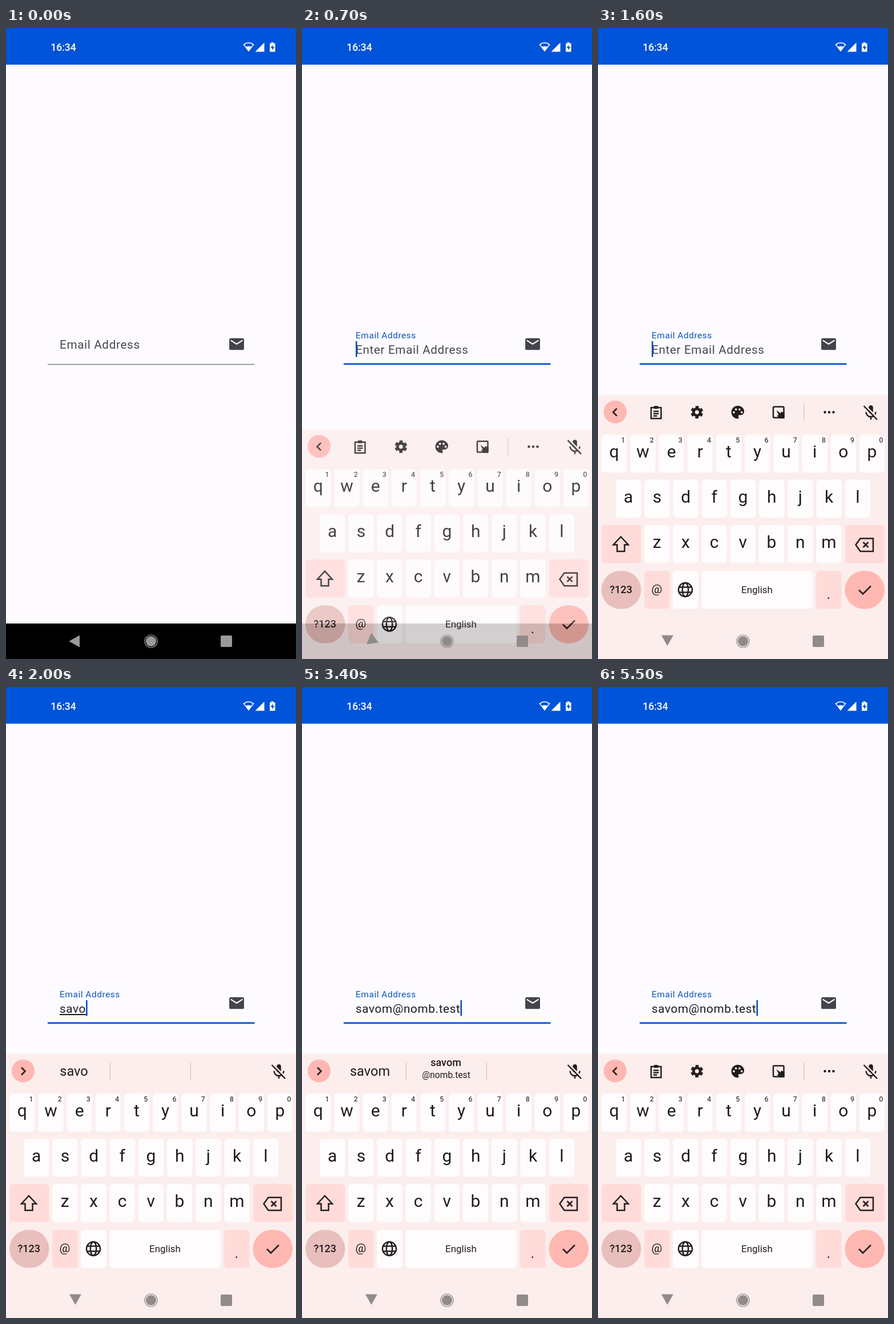
These frames come from a looping animation (508 px wide and 1102 px high, 5.9 s). An HTML page:

```html
<!DOCTYPE html>
<html lang="en">
<head>
<meta charset="utf-8">
<title>Email field</title>
<style>
  html, body { margin: 0; width: 100%; height: 100%; overflow: hidden; background: #fdfbff; }
  svg { display: block; width: 100vw; height: 100vh; font-family: Roboto, sans-serif; }
  .mid { text-anchor: middle; }
  .field { font-size: 20.7px; letter-spacing: .646px; }
  .line { fill: none; stroke: #241e1f; stroke-width: 2.5; }
  #keyboard { fill: #211b1c; }
</style>
</head>
<body>
<svg id="stage" viewBox="0 0 508 1102" preserveAspectRatio="none"></svg>
<script>
const LOOP = 5900, NAME = 'savom', DOMAIN = '@nomb.test';
const PANEL = '#fceeed', WHITE = '#fffcfd', PINK = '#ffdcda', CORAL = '#ffb7b1';
const BLUE = '#0055d4', PITCH = 50.2;
const CARET_TOGGLES = [600, 1000, 1600, 2600, 3100, 4000, 4500, 5000, 5500];

const text = (x, y, size, str, extra = '') =>
  `<text class="mid" x="${x}" y="${y}" font-size="${size}" ${extra}>${str}</text>`;
const rect = (x, y, w, h, fill, r = 0, extra = '') =>
  `<rect x="${x}" y="${y}" width="${w}" height="${h}" rx="${r}" fill="${fill}" ${extra}/>`;
const circle = (x, y, r, extra = '') => `<circle cx="${x}" cy="${y}" r="${r}" ${extra}/>`;
const line = (d, extra = '') => `<path class="line" d="${d}" ${extra}/>`;
const divider = x => rect(x, 656, 1.5, 30, '#d8caca');

const letterRow = (letters, x, y, digits = '') => [...letters].map((c, i) => {
  const left = x + i * PITCH;
  return rect(left, y, 44.5, 66.5, WHITE, 6) + text(left + 22.2, y + 39.5, 30, c) +
    (digits ? text(left + 38, y + 14, 12.5, digits[i], 'font-weight="500" fill="#4a4243"') : '');
}).join('');

const statusBar = rect(0, 0, 508, 64, '#0054d9') +
  `<g fill="#fff">${text(100.5, 40, 17.5, '16:34', 'font-weight="500"')}
    <path d="M416.5 29Q425 22.5 433.5 29L425 40Z" fill="none" stroke="#fff" stroke-width="1.6"/>
    <path d="M419.5 33.5Q425 30 430.5 33.5L425 41Z"/>
    <path d="M452.5 25.5V41.5H436.5Z"/>
    <path d="M464.5 25h4v2h3v14.5h-9.5V27h2.500Z"/>
    <path d="M467.500 29l-4 6h2.800v4l4-6h-2.800Z" fill="#0054d9"/></g>`;

const field = `
  <rect id="rule" x="73" width="362.500"/>
  <text id="label" fill="#48464c"></text>
  <text id="hint" class="field" x="94" y="569" fill="#49464c">Enter Email Address</text>
  <text id="value" class="field" x="94" y="569" fill="#1d1b1f"></text>
  <rect id="caret" y="547" width="2.6" height="27.500" fill="#0a50b8"/>
  <path transform="translate(388.5 536.5) scale(1.293)" fill="#45444e"
    d="M20 4H4a2 2 0 0 0-2 2v12a2 2 0 0 0 2 2h16a2 2 0 0 0 2-2V6a2 2 0 0 0-2-2zm0 4l-8 5-8-5V6l8 5 8-5z"/>`;

const clipboard = line('M93 663H110.500V682H93ZM97 669.500H106.500M97 673.500H106.500M97 677.500H103.500', 'stroke-width="2"') +
  rect(97.500, 660, 8.500, 5, '#241e1f', 2);
const gear = circle(173.3, 671, 5.9, 'class="line" style="stroke-width:4.8"') +
  circle(173.3, 671, 9, 'class="line" style="stroke-width:4" stroke-dasharray="5.4 4.025" stroke-dashoffset="-2.01"');
const palette = `<g transform="translate(229.800 656) scale(1.25)">
  <path d="M12 3a9 9 0 0 0 0 18c.8 0 1.5-.7 1.5-1.500 0-.8-.8-1.200-.8-2 0-.8.7-1.500 1.500-1.500H16a5 5 0 0 0 5-5C21 6.600 17 3 12 3z"/>
  <g fill="${PANEL}">${[[6.5, 12], [9.5, 8], [14.5, 8], [17.5, 12]].map(([x, y]) => circle(x, y, 1.5)).join('')}</g></g>`;
const resize = rect(307, 661.500, 18.500, 19, 'none', 1.5, 'class="line"') +
  '<path d="M312.500 667.500l7 5.500 1.500-3 5.500 2v10h-8l-5-5 3-1Z"/>';
const mic = rect(474.2, 659, 7.6, 14, '#241e1f', 3.8) +
  line('M469.500 670.500a8.500 8.500 0 0 0 17 0M478 679V684') +
  line('M467.500 658.500L491 682.500', `style="stroke:${PANEL}"`) + line('M465.500 660L489 684');

const toolbar = `<g id="toolbar">${line('M33 664.500L26.500 671L33 677.500') + clipboard + gear + palette + resize +
  divider(360.3) + [397.5, 405, 412.5].map(x => circle(x, 671, 2.2)).join('')}</g>`;
const suggestions = `<g id="suggestions">${line('M27 664.500L33.500 671L27 677.500')}
  ${text(119, 679, 23.6, '', 'id="word"') + divider(181.7) + divider(322.700)}
  <g id="completion">${text(252, 661.5, 18, NAME, 'font-weight="500"') + text(252.5, 683, 15.6, DOMAIN)}</g></g>`;

const bottomRow = rect(6, 948, 69.5, 66.5, '#e8bfbc', 33.2) + text(40.3, 987, 18, '?123', 'font-weight="500"') +
  rect(81, 948, 44.5, 66.5, PINK, 6) + text(103, 987, 21, '@') +
  rect(131, 948, 44.5, 66.5, WHITE, 6) +
  line('M142 976.500H164M142 985.500H164') + circle(153, 981, 12, 'class="line"') +
  '<ellipse class="line" cx="153" cy="981" rx="5.2" ry="12"/>' +
  rect(181, 948, 195.5, 66.5, WHITE, 6) + text(278.5, 986.5, 17, 'English') +
  rect(382, 948, 44.5, 66.5, PINK, 6) + text(404, 997, 24, '.') +
  rect(432.5, 948, 69.5, 66.5, CORAL, 33.2) + line('M457 981.500L464 988.500L478 974.500');

const keyboard = `<g id="keyboard">${rect(0, 640.5, 508, 461.5, PANEL) +
  circle(30, 670.500, 20, `fill="${CORAL}"`) + toolbar + suggestions + mic +
  letterRow('qwertyuiop', 6, 710, '1234567890') +
  letterRow('asdfghjkl', 31, 789) +
  rect(6, 868, 69.5, 66.5, PINK, 6) + line('M40 888.500L53 902.500H46.500V914H33.500V902.500H27Z') +
  letterRow('zxcvbnm', 81, 868) +
  rect(433, 868, 69.5, 66.5, PINK, 6) +
  line('M451.500 902.500L459.500 891.500H482V914H459.500ZM464.500 898L473.500 907M473.500 898L464.500 907') +
  bottomRow}</g>`;

const navigation = `<g id="nav"><path id="back" d="M-9.500 0L9-10.500V10.500Z"/>
  ${circle(254, 1071, 9)}${circle(254, 1071, 11, 'fill="none" stroke="currentColor" stroke-width="1.2"')}
  <rect x="376" y="1061" width="20" height="20" rx="2"/></g>`;

document.getElementById('stage').innerHTML = rect(0, 0, 508, 1102, '#fdfbff') + statusBar + field +
  rect(0, 1040, 508, 62, '#000') + keyboard + navigation;

const el = id => document.getElementById(id);
const set = (id, attrs) => { for (const key in attrs) el(id).setAttribute(key, attrs[key]); };
const progress = (t, start, length) => Math.min(1, Math.max(0, (t - start) / length));
const ease = p => p * p / (p * p + (1 - p) ** 2 / 2);
const mix = (a, b, p) => a + (b - a) * p;

function draw(now) {
  // The screen refreshes ten times a second.
  const t = Math.floor(now % LOOP / 100) * 100;
  const focus = ease(progress(t, 450, 200));
  const rise = progress(t, 500, 230);
  const turn = progress(t, 600, 240);

  const weight = mix(1.4, 2.8, focus);
  set('rule', { y: 588.2 - weight, height: weight, fill: t < 500 ? '#7a7780' : BLUE });
  set('label', {
    x: 94, y: mix(560, 542, focus), 'font-size': mix(20.7, 15.5, focus),
    'letter-spacing': mix(.646, .517, focus), fill: focus < .5 ? '#48464c' : '#0b55bd'
  });

  const typed = NAME.slice(0, Math.max(0, (t - 1600) / 100));
  const accepted = t >= 3400;
  const value = el('value');
  value.textContent = accepted ? NAME + DOMAIN : typed;
  set('value', { 'text-decoration': accepted ? 'none' : 'underline' });
  set('hint', { opacity: typed ? 0 : progress(t, 570, 100) });
  set('caret', {
    x: 94 + (typed ? value.getComputedTextLength() : 0),
    opacity: CARET_TOGGLES.filter(at => at <= t).length % 2
  });

  const strip = t < 1700 ? 0 : 1 - progress(t, 3400, 200);
  el('word').textContent = typed;
  set('suggestions', { opacity: strip });
  set('toolbar', { opacity: 1 - strip });
  set('completion', { opacity: t >= 2400 ? 1 : 0 });

  set('keyboard', { transform: `translate(0 ${461 * (1 - rise)})`, opacity: rise ** 1.4 });
  const grey = t < 700 ? '#9b9a9b' : '#918a8a';
  set('nav', { fill: grey, color: grey });
  set('back', { transform: `translate(${120 + 1.5 * turn} ${1071 - 1.5 * turn}) rotate(${-90 * turn})` });
}

el('label').textContent = 'Email Address';
const started = performance.now();
function tick() {
  draw(performance.now() - started);
  requestAnimationFrame(tick);
}
tick();
</script>
</body>
</html>
```
